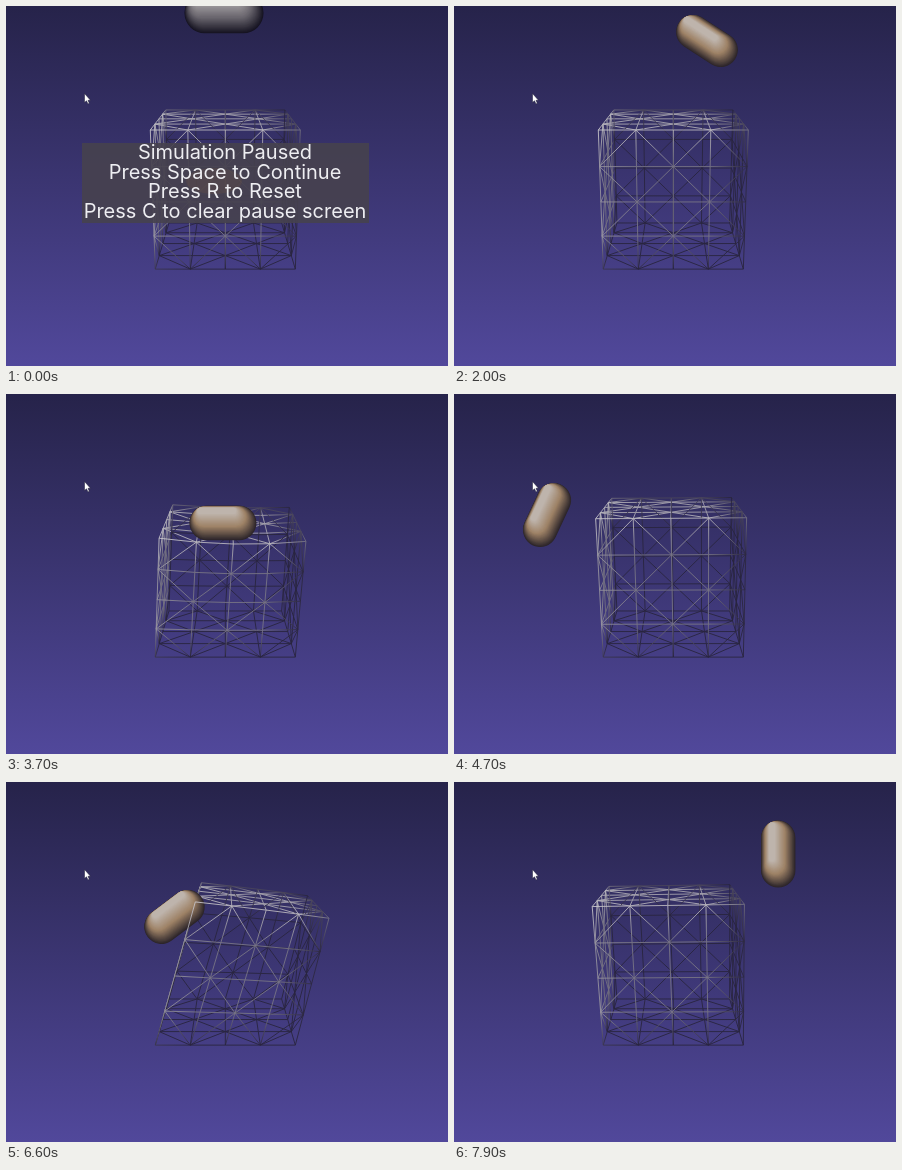
Recreate the animation shown at these times as an HTML page with a canvas. Size 442 by 360 pixels, loop 8 s.

```html
<!DOCTYPE html>
<html>
<head>
<meta charset="utf-8">
<style>
html, body { margin: 0; width: 100%; height: 100%; overflow: hidden; background: #3b3570; }
canvas { display: block; }
</style>
</head>
<body>
<canvas id="stage" width="442" height="360"></canvas>
<script>
const ctx = document.getElementById('stage').getContext('2d');
const LOOP = 8000, N = 4;

// Capsule path: time, x, y, angle in degrees
const path = [
  [0, 218, 7, 0], [900, 235, 62, 12], [1300, 352, 105, 58], [2000, 253, 35, 33],
  [2200, 335, 62, 40], [2430, 120, 72, 10], [2700, 217, 99, 0], [3700, 217, 129, 0],
  [4200, 140, 96, -40], [4700, 93, 121, -65], [5400, 166, 142, -84],
  [6000, 146, 137, -60], [6600, 168.5, 135, -37], [7000, 110, 98, -55],
  [7450, 225, 25, -80], [7900, 324, 72, -90]
];

// Smooth cubic through timed keys
function sample(keys, t) {
  let i = 0;
  while (i < keys.length - 2 && keys[i + 1][0] <= t) i++;
  const a = keys[i], b = keys[i + 1];
  const before = keys[i - 1] || a, after = keys[i + 2] || b;
  const span = b[0] - a[0], u = (t - a[0]) / span;
  return a.slice(1).map((p, k) => {
    const c = k + 1, q = b[c];
    const m = (q - before[c]) / (b[0] - before[0]) * span;
    const n = (after[c] - p) / (after[0] - a[0]) * span;
    return p + u * (m + u * (3 * (q - p) - 2 * m - n + u * (2 * (p - q) + m + n)));
  });
}

// Eased push that is held, then let go into a fading wobble
function push(t, start, release, amount, fade) {
  const u = Math.min(1, Math.max(0, (t - start) / 500));
  const free = Math.max(0, t - release);
  return amount * u * u * (3 - 2 * u) * Math.exp(-free / fade) * Math.cos(free / 480 * 2 * Math.PI);
}

const light = [-.45, -.75, -.48];
const points = [], edges = [], index = {};

for (let i = 0; i <= N; i++) for (let j = 0; j <= N; j++) for (let k = 0; k <= N; k++) {
  const p = [i, j, k];
  if (!p.some(c => c % N === 0)) continue;
  const normal = p.map(c => c === 0 ? -1 : c === N ? 1 : 0);
  const dot = normal.reduce((sum, c, n) => sum + c * light[n], 0);
  index[p] = points.length;
  points.push({ p, lum: Math.max(0, dot / Math.hypot(...normal)) });
}

// Grid lines, plus face diagonals between odd points
const steps = [[1,0,0], [0,1,0], [0,0,1], [1,1,0], [1,-1,0], [1,0,1], [1,0,-1], [0,1,1], [0,1,-1]];
points.forEach(({ p }, a) => steps.forEach((d, s) => {
  if (s > 2 && (p[0] + p[1] + p[2]) % 2 === 0) return;
  const b = index[p.map((c, n) => c + d[n])];
  if (b === undefined || !p.some((c, n) => d[n] === 0 && c % N === 0)) return;
  edges.push({ a, b, front: p[2] === 0 && d[2] === 0 });
}));

function project([i, j, k], shear, drop) {
  const x = i / 2 - 1, v = j / N, z = k / N, h = 1 - v;
  const depth = 1 + .071 * v + .26 * z;
  const dx = shear * (1 - .2 * x - .1 * x * x) * h;
  const dy = (drop * (1.2 - .2 * x * x) * (1 - .55 * z) + shear * (.1 + .2 * x)) * h;
  return [219.3 + (75 * x + dx) / depth, (124 + 157.8 * v + 7 * z + dy) / depth];
}

const mix = (a, b, u) => a.map((c, n) => c + (b[n] - c) * u);
const rgb = c => `rgb(${c.map(Math.round)})`;
const lineColor = lum => rgb(mix([40, 36, 62], [205, 203, 208], lum));

function drawEdges(spots, front) {
  ctx.lineWidth = .9;
  for (const e of edges) {
    if (e.front !== front) continue;
    const p = spots[e.a], q = spots[e.b];
    const shade = ctx.createLinearGradient(...p, ...q);
    shade.addColorStop(0, lineColor(points[e.a].lum));
    shade.addColorStop(1, lineColor(points[e.b].lum));
    ctx.strokeStyle = shade;
    ctx.beginPath();
    ctx.moveTo(...p);
    ctx.lineTo(...q);
    ctx.stroke();
  }
}

// Nested strokes shrink toward the light; near the viewer the capsule is larger and gray
function drawCapsule([x, y, angle], near) {
  const scale = 1 + .18 * near, r = 17.2 * scale, a = angle * Math.PI / 180;
  const cx = 16.3 * scale * Math.cos(a), cy = 16.3 * scale * Math.sin(a);
  const dark = mix([44, 37, 42], [22, 20, 34], near);
  const mid = mix([158, 130, 102], [106, 102, 110], near);
  const pale = mix([190, 180, 172], [170, 166, 168], near);
  ctx.lineCap = 'round';
  for (let n = 0; n <= 30; n++) {
    const u = n / 30, shift = r * u * .8;
    const ox = x - .45 * shift, oy = y - .88 * shift;
    ctx.strokeStyle = rgb(u < .5 ? mix(dark, mid, u / .5) : mix(mid, pale, (u - .5) / .5));
    ctx.lineWidth = 2 * r * (1 - u * .82);
    ctx.beginPath();
    ctx.moveTo(ox - cx, oy - cy);
    ctx.lineTo(ox + cx, oy + cy);
    ctx.stroke();
  }
  ctx.lineCap = 'butt';
}

function drawPause() {
  ctx.fillStyle = 'rgba(70,66,78,.9)';
  ctx.fillRect(76, 137, 287, 80);
  ctx.fillStyle = 'rgba(150,100,50,.14)';
  ctx.beginPath();
  ctx.ellipse(208, 175, 28, 13, 0, 0, 7);
  ctx.fill();
  ctx.fillStyle = '#eeeef2';
  ctx.font = '400 20px Inter, Lato, sans-serif';
  ctx.textAlign = 'center';
  ['Simulation Paused', 'Press Space to Continue', 'Press R to Reset', 'Press C to clear pause screen']
    .forEach((line, n) => ctx.fillText(line, 219, 153 + n * 19.6));
}

const cursor = new Path2D('M78.5 87.5V96.5L80.5 94.8L82 98L83.3 97.3L82 94.3H84.5Z');
const sky = ctx.createLinearGradient(0, 0, 0, 360);
sky.addColorStop(0, '#26234a');
sky.addColorStop(1, '#51489b');

function draw(now) {
  const t = now % LOOP;
  const shear = push(t, 2800, 4000, 8, 600) + push(t, 5030, 6700, 41, 600);
  const drop = push(t, 2500, 3750, 21, 250);
  const spots = points.map(({ p }) => project(p, shear, drop));
  ctx.fillStyle = sky;
  ctx.fillRect(0, 0, 442, 360);
  drawEdges(spots, false);
  drawCapsule(sample(path, t), Math.max(0, 1 - t / 800));
  drawEdges(spots, true);
  if (t < 100) drawPause();
  ctx.fillStyle = '#fff';
  ctx.fill(cursor);
  ctx.strokeStyle = '#1c1a35';
  ctx.lineWidth = .5;
  ctx.stroke(cursor);
  requestAnimationFrame(draw);
}
requestAnimationFrame(draw);
</script>
</body>
</html>
```
